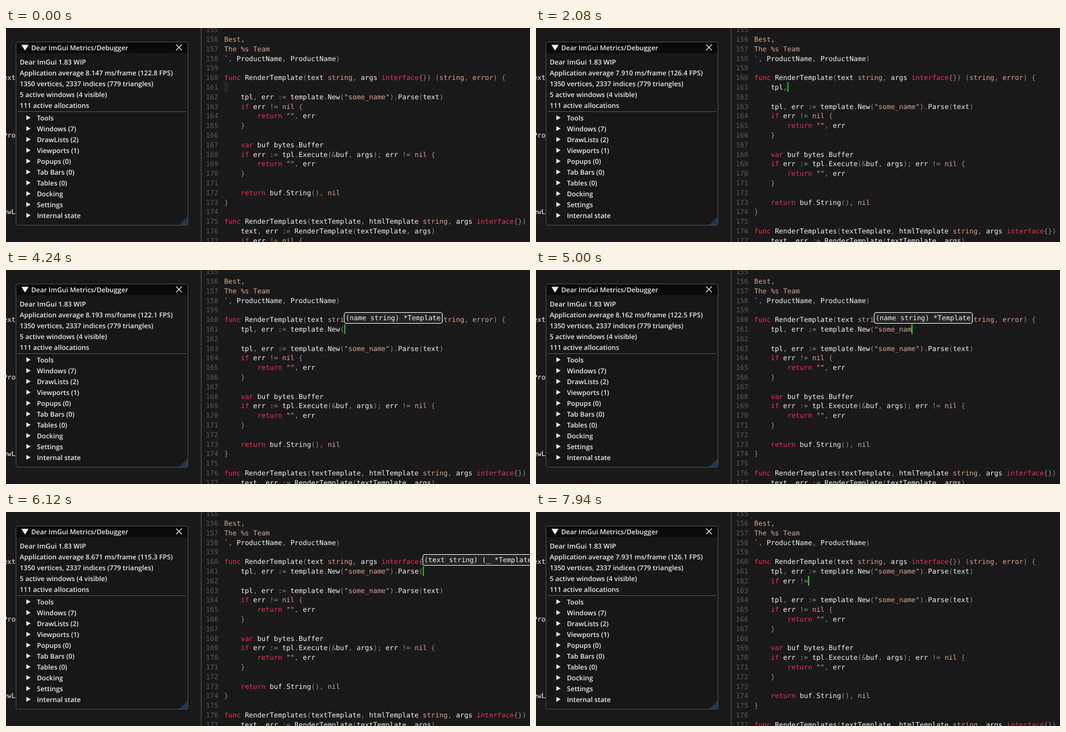
Recreate the animation shown at these times as an HTML page. Size 915 px wide and 375 px high, loop 8 s.

```html
<!DOCTYPE html>
<html lang="en">
<head>
<meta charset="utf-8">
<title>Code completion</title>
<style>
  html, body { margin: 0; width: 100%; height: 100%; overflow: hidden; background: #191919; }
  svg { display: block; width: 915px; height: 375px; }
  text { white-space: pre; text-rendering: geometricPrecision; }
  .code { font: 12px "DejaVu Sans Mono", monospace; fill: #f2f2f2; }
  .ui { font: 600 11.75px "Open Sans", sans-serif; fill: #ececec; }
  .num { fill: #595959; }
  .key { fill: #ee3158; }
  .str { fill: #d8a590; }
  .punct { fill: #8c8c8c; }
</style>
</head>
<body>
<svg viewBox="0 0 915 375">
  <rect width="915" height="375" fill="#191919"/>
  <rect x="340" width="1.5" height="375" fill="#484848"/>
  <g class="code">
    <text x="-5" y="91">ext</text>
    <text x="-5" y="192">Pro</text>
    <text x="-5" y="326">ewL</text>
  </g>
  <rect x="17.5" y="24.5" width="300" height="321" rx="3" fill="#171717"/>
  <path d="M18 44V27q0-2 2-2H315q2 0 2 2V44z" fill="#0a0a0a"/>
  <path d="M301.5 345.5L317.5 330.5V342.5q0 3-3 3z" fill="#20364e"/>
  <rect x="17.5" y="24.5" width="300" height="321" rx="3" fill="none" stroke="#505055"/>
  <path d="M20 146.5H315" stroke="#55555a"/>
  <path d="M27 29.5H39.5L33.2 39.5z" fill="#f2f2f2"/>
  <path d="M297 29L307 39M307 29L297 39" stroke="#f2f2f2" stroke-width="1.2"/>
  <g id="panel" class="ui"></g>
  <g id="editor" class="code"></g>
</svg>
<script>
const LOOP = 8000, STEP = 69.6;
const CELL = 7.224, ROW = 16.8, LEFT = 381, FIRST = 155;
const EDIT_ROW = 161, OPEN_AT = 8;

const head = ["", "~Best,", "~The %s Team", "`, ProductName, ProductName)", "",
  "func RenderTemplate(text string, args interface{}) (string, error) {"];
const tail = ["",
  '    tpl, err := template.New("some_name").Parse(text)',
  "    if err != nil {", '        return "", err', "    }", "",
  "    var buf bytes.Buffer",
  "    if err := tpl.Execute(&buf, args); err != nil {",
  '        return "", err', "    }", "",
  "    return buf.String(), nil", "}", "",
  "func RenderTemplates(textTemplate, htmlTemplate string, args interface{})",
  "    text, err := RenderTemplate(textTemplate, args)",
  "    if err != nil {"];

const packageNames = ["ExecError", "IsTrue", "FuncMap", "HTMLEscape", "HTMLEscapeString",
  "HTMLEscaper", "JSEscape", "JSEscapeString", "JSEscaper", "URLQueryEscaper", "New"];
const methodNames = ["Name", "ParseName", "Root", "Mode", "Copy", "ErrorContext", "Parse",
  "ExecuteTemplate", "Execute", "DefinedTemplates"];
const signatures = { New: "(name string) *Template", Parse: "(text string) (_ *Template, _ error)" };

// Typing runs: first step, steps per key, keys ("<" deletes one character)
const runs = [
  [13, 1, "template"], [22, .45, "<<<<<<<"], [26, 1.2, "pl,"], [31, 1.2, " err "],
  [37, .75, ":= template."], [50, 2, "New"], [59.6, 1, "("], [62, 1.2, '"some_nam'],
  [72.5, .85, 'e").'], [79, 1.2, "Parse"], [86.5, 1, "("], [89.5, 1.1, "text"],
  [94.5, 1, ")"], [99, 1, "\n"], [104, 1.3, "if "], [109, .9, "err !="]];
const keys = runs.flatMap(([start, gap, text]) =>
  [...text].map((char, i) => ({ at: start + i * gap, char })));

// Frame time in ms by step
const timing = [[0, 8.1466], [12, 7.96], [19, 7.87], [30, 7.91], [47, 8.079], [61, 8.193],
  [77, 8.148], [88, 8.671], [102, 7.98], [108, 7.955], [114, 7.931], [115, 7.93]];

const panel = document.getElementById("panel");
const editor = document.getElementById("editor");
const escapeText = s => s.replace(/&/g, "&amp;").replace(/</g, "&lt;");
const label = (x, y, s) => `<text x="${x}" y="${y}">${escapeText(s)}</text>`;
const box = (x, y, w, h, r, style) =>
  `<rect x="${x}" y="${y}" width="${w}" height="${h}" rx="${r}" ${style}/>`;
const baseline = row => Math.round(24 + (row - 156) * ROW);

function frameTime(step) {
  const i = Math.max(1, timing.findIndex(p => p[0] >= step));
  const [[a, from], [b, to]] = [timing[i - 1], timing[i]];
  return from + (to - from) * (step - a) / (b - a);
}

function tokenClass(token) {
  if (/^(func|if|return|var|interface)$/.test(token)) return "key";
  if (/^(["`]|(string|error|nil)$)/.test(token)) return "str";
  return /^[\w\s]/.test(token) ? "" : "punct";
}

function highlight(line) {
  const span = (name, s) => name ? `<tspan class="${name}">${escapeText(s)}</tspan>` : escapeText(s);
  if (line[0] === "~") return span("str", line.slice(1));
  const tokens = line.match(/"[^"]*"?|`|\w+|\s+|[^\w\s"`]+/g) || [];
  return tokens.map(t => span(tokenClass(t), t)).join("");
}

function typedState(step) {
  let text = "    ", last = OPEN_AT;
  for (const { at, char } of keys) {
    if (at > step) break;
    text = char === "<" ? text.slice(0, -1) : text + char + (char === "\n" ? "    " : "");
    last = at;
  }
  return { lines: text.split("\n"), idle: (step - last) * STEP };
}

function completion(line) {
  const match = line.match(/(.)\.(\w*)$/);
  if (!match) return "";
  const source = match[1] === ")" ? methodNames : packageNames;
  const names = source.filter(n => n.startsWith(match[2])).slice(0, 10);
  const x = LEFT + (line.length - match[2].length) * CELL - .1;
  const width = Math.max(...names.map(n => n.length)) * CELL + 21.5;
  return box(x, 116.5, width, names.length * 18 + 9, 5, 'fill="#000" stroke="#fff" stroke-width="1.2"') +
    box(x + 4.5, 121.5, width - 9, 17.5, 4, 'fill="#333"') +
    names.map((n, i) => label(x + 10.3, 134 + i * 18, n)).join("");
}

function signature(line) {
  const match = line.match(/(\w+)\([^)]*$/);
  if (!match) return "";
  const text = signatures[match[1]];
  const x = LEFT + (match.index + match[1].length + 1) * CELL;
  return box(x, 74.5, text.length * CELL + 5.3, 19, 4, 'fill="#242424" stroke="#fff" stroke-width="1.1"') +
    label(x + 2.4, 88, text);
}

function drawEditor(step) {
  const open = step >= OPEN_AT;
  const { lines, idle } = typedState(step);
  const all = [...head, ...(open ? lines : []), ...tail];
  let out = all.map((line, i) => {
    const y = baseline(FIRST + i);
    return `<text class="num" x="349" y="${y}">${FIRST + i}</text>` +
      `<text x="${LEFT}" y="${y}">${highlight(line)}</text>`;
  }).join("");

  const pulse = ms => .1 + .9 * (.5 + .5 * Math.cos(ms / 800 * 2 * Math.PI));
  const cursor = (x, row, w, fill, alpha) =>
    box(x, baseline(row) - 13, w, 17, 0, `fill="${fill}" opacity="${alpha}"`);
  if (!open) {
    out += cursor(LEFT, EDIT_ROW, 7, "#999", pulse(400 + step * STEP));
  } else {
    const line = lines[lines.length - 1];
    out += cursor(LEFT + line.length * CELL, EDIT_ROW + lines.length - 1, 2, "#08ee2c", pulse(idle));
    out += completion(line) + signature(line);
  }
  editor.innerHTML = out;
}

const tree = ["Tools", "Windows (7)", "DrawLists (2)", "Viewports (1)", "Popups (0)",
  "Tab Bars (0)", "Tables (0)", "Docking", "Settings", "Internal state"];
panel.innerHTML = label(44, 39, "Dear ImGui Metrics/Debugger") +
  ["Dear ImGui 1.83 WIP", "", "1350 vertices, 2337 indices (779 triangles)",
    "5 active windows (4 visible)", "111 active allocations"]
    .map((s, i) => label(24, 64 + i * 19, s)).join("") +
  tree.map((s, i) => label(54, 162 + i * 19, s) +
    `<path d="M35.5 ${153 + i * 19}l7.5 4.2l-7.5 4.2z"/>`).join("");
const average = panel.querySelectorAll("text")[2];

function draw(step) {
  const ms = frameTime(step);
  average.textContent =
    `Application average ${ms.toFixed(3)} ms/frame (${(1000 / ms).toFixed(1)} FPS)`;
  drawEditor(step);
}

const start = performance.now();
let shown = -1;
function tick() {
  const time = (performance.now() - start) % LOOP;
  const step = Math.min(114, Math.floor(time / STEP + .2));
  if (step !== shown) draw(shown = step);
  requestAnimationFrame(tick);
}
tick();
</script>
</body>
</html>
```
